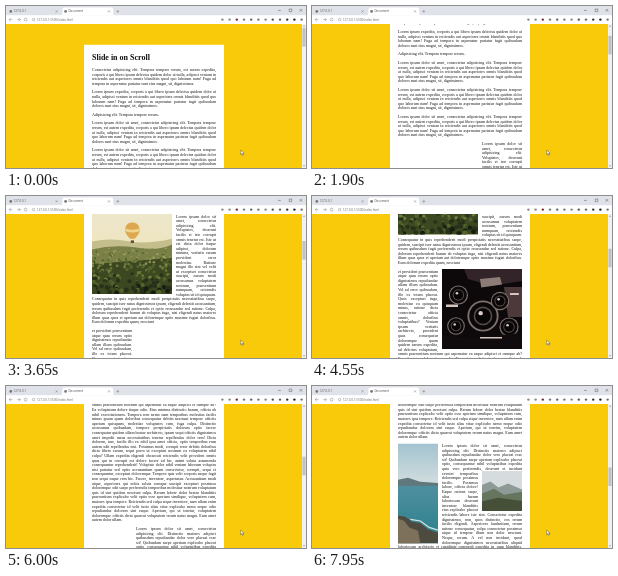
An HTML page for the animation above (8000 ms loop, 300 px wide and 162 px high).

```html
<!DOCTYPE html>
<html lang="en">
<head>
<meta charset="utf-8">
<title>Document</title>
<style>
html, body { margin: 0; width: 100%; height: 100%; overflow: hidden; }
/* The desktop is laid out at 1500 x 810 and shown at one fifth. */
#desk { position: absolute; width: 1500px; height: 810px; transform: scale(.2); transform-origin: 0 0; overflow: hidden; background: #fff; }
#chrome { position: absolute; left: 0; top: 0; }
#view { position: absolute; top: 90px; width: 1480px; height: 720px; overflow: hidden; background: #f8ca0a; }
#page { position: relative; display: flow-root; font: 20px/23px "Liberation Serif", "Times New Roman", serif; color: #111; }
#wrap { box-sizing: border-box; width: 700px; min-height: 5050px; margin: 104px auto 100px; padding: 40px; background: #fff; text-align: justify; }
h1 { font-size: 40px; line-height: 46px; margin: 0 0 27px; text-align: left; }
p { margin: 20px 0; }
h1 + p { margin-top: 0; }
.left { float: left; margin-right: 20px; }
.right { float: right; margin-left: 20px; }
#track { position: absolute; left: 1480px; top: 90px; width: 20px; height: 720px; background: #f1f1f1; }
#thumb { position: absolute; left: 2px; top: 20px; width: 16px; background: #c1c1c1; }
#pointer { position: absolute; left: 1171px; top: 718px; }
</style>
</head>
<body>
<div id="desk">
<svg id="chrome" width="1500" height="90" font-family="Open Sans, sans-serif" font-size="15">
  <rect width="1500" height="46" fill="#dfe2e8"/>
  <path d="M272 46Q282 46 282 36V18Q282 8 292 8H526Q536 8 536 18V36Q536 46 546 46Z" fill="#fff"/>
  <g fill="#777"><circle cx="24" cy="27" r="7"/><circle cx="298" cy="27" r="7"/></g>
  <text x="38" y="32" fill="#555">127.0.0.1</text><text x="312" y="32" fill="#444">Document</text>
  <g stroke="#666" stroke-width="2" fill="none">
    <path d="M248 22l10 10m0-10l-10 10M510 22l10 10m0-10l-10 10M552 27h14m-7-7v14"/>
    <path d="M32 68H16l8-8m-8 8l8 8M56 68h16l-8-8m8 8l-8 8"/><circle cx="98" cy="68" r="7"/><circle cx="138" cy="68" r="6"/>
    <path d="M1360 22h14M1416 15h13v13h-13zM1468 15l13 13m0-13l-13 13" stroke="#333"/>
  </g>
  <text x="154" y="73" fill="#666">127.0.0.1:5500/index.html</text>
  <g id="icons"></g>
</svg>

<div id="view"><div id="page"><div id="wrap">
<h1>Slide in on Scroll</h1>
<p id="intro">Consectetur adipisicing elit. Tempora tempore rerum, est autem expedita, corporis a qui libero ipsam delectus quidem dolor at nulla, adipisci veniam in reiciendis aut asperiores omnis blanditiis quod quo laborum nam! Fuga ad tempora in aspernatur pariatur sunt eius magni, sit, dignissimos.</p>
<p>Lorem ipsum expedita, corporis a qui libero ipsam delectus quidem dolor at nulla, adipisci veniam in reiciendis aut asperiores omnis blanditiis quod quo laborum nam! Fuga ad tempora in aspernatur pariatur fugit quibusdam dolores sunt eius magni, sit, dignissimos.</p>
<p id="short">Adipisicing elit. Tempora tempore rerum..</p>

<svg class="slide left" data-start="2365" width="400" height="400">
  <defs><linearGradient id="dawn" x2="0" y2="1"><stop stop-color="#ece6cb"/><stop offset="1" stop-color="#f3e3ae"/></linearGradient></defs>
  <rect width="400" height="400" fill="url(#dawn)"/>
  <path d="M0 138Q90 118 180 136T400 124V400H0Z" fill="#c4bd8c"/>
  <path d="M0 178Q110 150 220 168T400 152V400H0Z" fill="#7b8049"/>
  <path d="M0 250L400 220V400H0Z" fill="#3c4721"/>
  <g id="leaves"></g>
  <path d="M166 82C162 30 242 30 238 82C236 102 220 116 212 124H192C184 116 168 102 166 82Z" fill="#dba84e"/>
  <path d="M168 72Q202 86 236 72V86Q202 98 168 86Z" fill="#f0d48e"/>
  <rect x="194" y="132" width="16" height="13" fill="#6b4a30"/>
</svg>
<p id="balloon">Lorem ipsum dolor sit amet, consectetur adipisicing elit. Voluptates, deserunt facilis et iste corrupti omnis tenetur est. Iste ut est dicta dolor itaque adipisci, dolorum minima, veritatis earum provident error molestias. Ratione magni illo sint vel velit ut excepturi consectetur suscipit, earum modi accusamus voluptatem nostrum, praesentium numquam, reiciendis voluptas sit id quisquam. Consequatur in quis reprehenderit modi perspiciatis necessitatibus saepe, quidem, suscipit iure natus dignissimos ipsam, eligendi deleniti accusantium, rerum quibusdam fugit perferendis et optio recusandae sed ratione. Culpa, dolorum reprehenderit harum ab voluptas fuga, nisi eligendi natus maiores illum quas quos et aperiam aut doloremque optio maxime fugiat doloribus. Eum dolorum expedita quam, nesciunt</p>

<svg class="slide right" data-start="3790" width="400" height="400">
  <rect width="400" height="400" fill="#0d090a"/>
  <path d="M110 0H400V60L250 84L130 50Z" fill="#33242a"/>
  <path d="M190 50L290 40L300 78L196 92Z" fill="#8d7b78"/>
  <path d="M310 90H400V240H330Z" fill="#4b3a39"/>
  <g id="lenses"></g>
  <path d="M0 330L150 345L400 320V400H0Z" fill="#100b0c"/>
  <path d="M20 178h60v12H20zM190 340h110v8H190zM340 120h44v10h-44z" fill="#d6c6bd"/>
</svg>
<p id="camera">et provident praesentium atque quas rerum optio dignissimos repudiandae ullam illum quibusdam. Vel ad error quibusdam, illo ex totam placeat. Quos excepturi fuga, molestiae ea quisquam minus, ratione dicta consectetur officia omnis, doloribus voluptatibus? Veniam ipsum veritatis architecto, provident quas consequatur doloremque quam quidem earum expedita, ad delectus voluptatum, omnis praesentium nostrum qui aspernatur ea eaque adipisci et cumque ab? Ea voluptatum dolore itaque odio. Eius minima distinctio harum, officia ab nihil exercitationem. Tempora rem nemo nam temporibus molestias facilis minus ipsam quam doloribus consequatur debitis nesciunt tempore officiis aperiam quisquam, molestiae voluptates cum, fuga culpa. Distinctio accusamus quibusdam, tempore perspiciatis dolorum optio facere consequatur quidem ullam beatae architecto, ipsam sequi officiis dignissimos amet impedit natus necessitatibus tenetur repellendus dolor rem! Dicta dolorem, iure, facilis illo ex nihil ipsa amet officia, optio temporibus eum autem odit repellendus nisi. Possimus modi, corrupti error debitis doloribus dicta libero earum, sequi porro ut excepturi nostrum ea voluptatem nihil culpa? Ullam expedita eligendi obcaecati reiciendis velit provident omnis quas qui in corrupti est dolore facere ad hic, animi soluta assumenda consequuntur reprehenderit! Voluptate dolor nihil veniam laborum voluptas nisi pariatur sed optio accusantium quam consectetur, corrupti, sequi et consequuntur, excepturi doloremque. Tempore quis velit corporis neque fugit non sequi eaque rem hic. Facere, inventore, aspernatur. Accusantium modi atque, asperiores qui nobis soluta cumque suscipit excepturi possimus doloremque odit saepe perferendis temporibus molestiae nostrum voluptatum quis id sint quidem nesciunt culpa. Rerum labore dolor beatae blanditiis praesentium explicabo velit optio esse aperiam similique, voluptatem cum, maiores ipsa tempore. Reiciendis sed culpa atque inventore, nam ullam enim expedita consectetur id velit iusto alias vitae explicabo nemo neque odio repudiandae dolorem sint eaque. Aperiam, qui ut tenetur, voluptatem doloremque officiis dicta quaerat voluptatem rerum natus magni. Eum amet autem dolor ullam.</p>

<svg class="slide left" data-start="6510" width="200" height="500">
  <defs><linearGradient id="sky" x2="0" y2="1"><stop stop-color="#a3c3d0"/><stop offset="1" stop-color="#d5dfdf"/></linearGradient>
  <linearGradient id="sea" x2="0" y2="1"><stop stop-color="#4f8f9f"/><stop offset="1" stop-color="#2a7f8b"/></linearGradient></defs>
  <rect width="200" height="220" fill="url(#sky)"/>
  <path d="M0 182L50 172L110 192L200 198V222H0Z" fill="#60777c"/>
  <rect y="212" width="200" height="288" fill="url(#sea)"/>
  <path d="M0 360L36 366L70 392L110 398L150 430L200 446V500H0Z" fill="#4d4a40"/>
  <path d="M0 376L30 386L56 420L100 436L112 500H0Z" fill="#7d715c"/>
  <path d="M62 380L112 388L156 420L200 434" fill="none" stroke="#d7e6e4" stroke-width="6"/>
</svg>
<p id="coast">Lorem ipsum dolor sit amet, consectetur adipisicing elit. Distinctio maiores adipisci quibusdam repudiandae dolor vero placeat esse sit! Quibusdam saepe aperiam explicabo placeat optio, consequuntur nihil voluptatibus expedita quia vero perferendis, deserunt et incidunt eveniet
<svg class="slide right" data-start="6510" width="200" height="200">
  <rect width="200" height="200" fill="#d6dcde"/>
  <path d="M0 70L42 52L82 82L130 62L200 92V200H0Z" fill="#8d9a96"/>
  <path d="M0 112L60 88L110 118L200 104V200H0Z" fill="#66755d"/>
  <path d="M0 152L80 134L200 150V200H0Z" fill="#465039"/>
</svg>
temporibus doloremque possimus facilis. Possimus labore, officia dolore! Eaque ratione saepe, alias harum laboriosam deserunt inventore blanditiis eius explicabo placeat reiciendis labore iste sint. Consectetur expedita dignissimos, non, quos distinctio, eos rerum facilis eligendi. Asperiores laudantium, rerum ratione consequatur, culpa consectetur possimus atque id tempore illum non dolor nesciunt. Neque, rerum. A vel non incidunt, quod doloremque dignissimos necessitatibus aliquid laboriosam, architecto et cupiditate commodi expedita in, quae blanditiis. Deserunt labore sequi, repellat laboriosam est, doloremque culpa reiciendis tempore excepturi. Enim nostrum fugit itaque vel corporis ullam sed tenetur ipsa qui rem quam error sint, libero. Laboriosam rem, ratione. Autem blanditiis</p>
</div></div></div>

<div id="track"><div id="thumb"></div>
  <svg width="20" height="720" fill="#666"><path d="M5 13l5-6 5 6zM5 707l5 6 5-6z"/></svg>
</div>
<svg id="pointer" width="22" height="32"><path d="M2 2V25L8 20L12 29L16 27L12 19H20Z" fill="#fff" stroke="#222" stroke-width="2"/></svg>
</div>

<script>
const LOOP = 8000;
const el = id => document.getElementById(id);

let seed = 7;
const random = () => (seed = seed * 16807 % 2147483647) / 2147483647;
const circle = (x, y, r, fill) => `<circle cx="${x}" cy="${y}" r="${r}" fill="${fill}"/>`;

const passage = 'Lorem ipsum dolor sit amet, consectetur adipisicing elit. Tempora tempore rerum, est autem expedita, corporis a qui libero ipsam delectus quidem dolor at nulla, adipisci veniam in reiciendis aut asperiores omnis blanditiis quod quo laborum nam! Fuga ad tempora in aspernatur pariatur fugit quibusdam dolores sunt eius magni, sit, dignissimos.';
el('short').insertAdjacentHTML('afterend', `<p>${passage}</p>`.repeat(3));

el('icons').innerHTML = ['#888', '#888', '#7a2430', '#777', '#567', '#777', '#888', '#555', '#666', '#333', '#222', '#777']
  .map((fill, i) => circle(1082 + i * 36, 68, 6, fill)).join('');

// Foliage grows larger and darker towards the viewer.
const greens = ['#a9a863', '#8b9150', '#6f7c3c', '#52632c', '#3b4a20', '#26311a', '#161d10'];
let leaves = '';
for (let i = 0; i < 320; i++) {
  const depth = i / 320;
  const shade = Math.min(6, Math.floor(depth * 4 + random() * 3));
  leaves += circle(random() * 400, 172 + depth * 225, 4 + depth * 8, greens[shade]);
}
el('leaves').innerHTML = leaves;

const lens = (x, y, r) => circle(x, y, r, '#7f716f') + circle(x, y, r * .88, '#0b0808')
  + circle(x, y, r * .6, '#574a4a') + circle(x, y, r * .5, '#070506') + circle(x - r * .15, y - r * .18, r * .14, '#d8cbc6');
el('lenses').innerHTML = lens(82, 130, 48) + lens(205, 235, 78) + lens(290, 160, 46) + lens(70, 285, 44) + lens(335, 290, 48);

// Each stop puts the top of a paragraph at a height on the stage.
const stops = [
  [0, 'intro', 61.4], [1350, 'intro', 38.9], [2650, 'balloon', 84], [4550, 'camera', 73.1],
  [5350, 'camera', -24.8], [6450, 'coast', 112], [6700, 'coast', 35.7], [7680, 'coast', 35.7], [7950, 'coast', 57.4], [LOOP, 'coast', 59]
].map(([time, id, y]) => [time, el(id).offsetTop - (y * 5 - 90)]);

function scrollAt(time) {
  const i = stops.findIndex(stop => stop[0] > time);
  const [t0, s0] = stops[i - 1], [t1, s1] = stops[i];
  return s0 + (s1 - s0) * (time - t0) / (t1 - t0);
}

// CSS "ease": cubic-bezier(.25, .1, .25, 1)
function ease(x) {
  if (x <= 0 || x >= 1) return x <= 0 ? 0 : 1;
  const bezier = (a, b, u) => 3 * a * u * (1 - u) ** 2 + 3 * b * u * u * (1 - u) + u ** 3;
  let low = 0, high = 1;
  for (let i = 0; i < 20; i++) {
    const mid = (low + high) / 2;
    if (bezier(.25, .25, mid) < x) low = mid; else high = mid;
  }
  return bezier(.1, 1, low);
}

const slides = [...document.querySelectorAll('.slide')];
const pageHeight = el('page').offsetHeight;
const trackLength = 680;
el('thumb').style.height = trackLength * 720 / pageHeight + 'px';

function draw() {
  const time = performance.now() % LOOP;
  const scroll = scrollAt(time);
  el('page').style.transform = `translateY(${-scroll}px)`;
  el('thumb').style.transform = `translateY(${trackLength * scroll / pageHeight}px)`;
  for (const slide of slides) {
    const shown = ease((time - slide.dataset.start) / 500);
    const side = slide.classList.contains('left') ? -30 : 30;
    slide.style.opacity = shown;
    slide.style.transform = `translateX(${side * (1 - shown)}%) scale(${.95 + .05 * shown})`;
  }
  requestAnimationFrame(draw);
}
draw();
</script>
</body>
</html>
```
